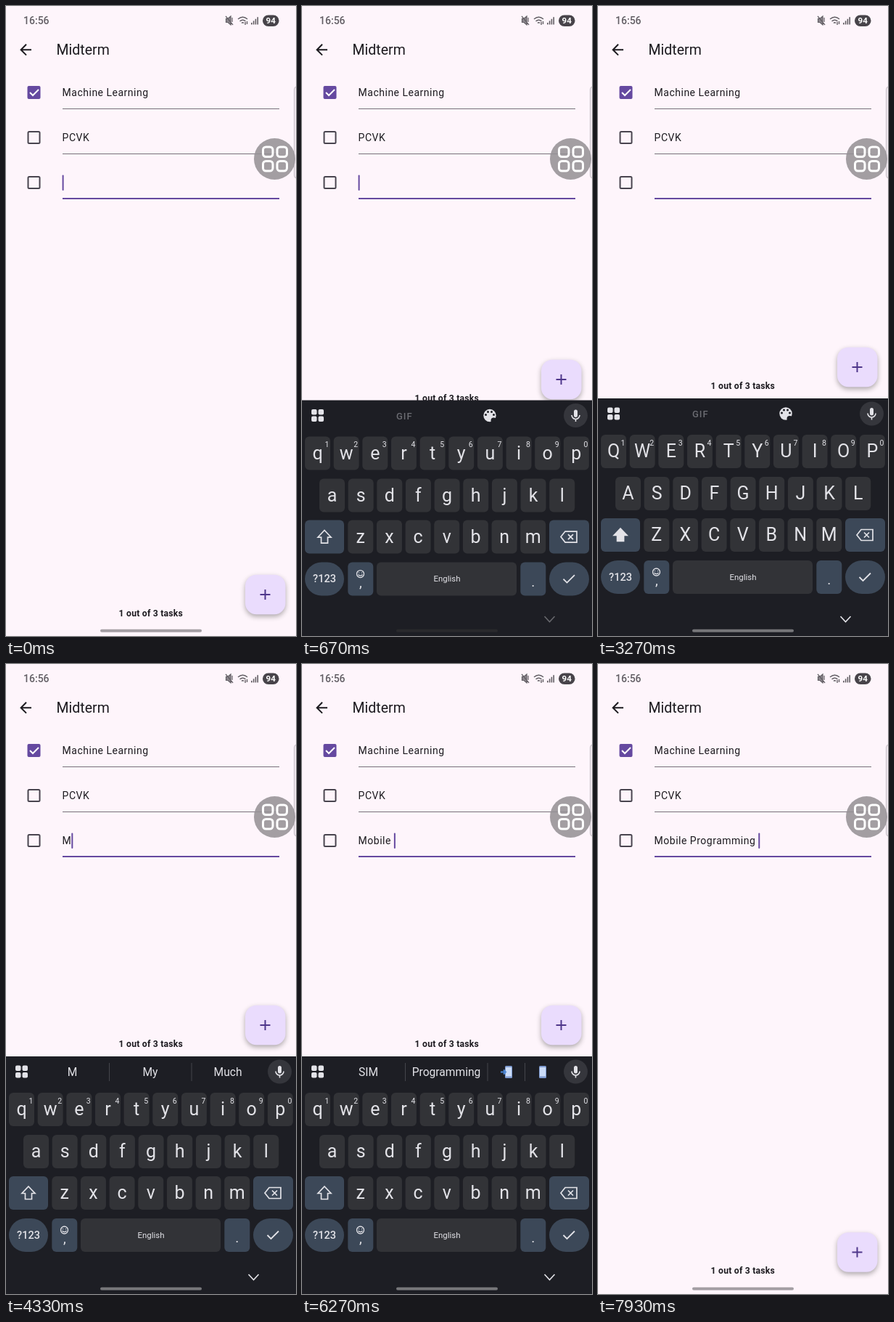
These frames come from a looping animation (400 by 867 pixels, 8 s). An HTML page with a canvas:

```html
<!DOCTYPE html>
<html lang="en">
<head>
<meta charset="utf-8">
<title>Task list</title>
<style>
  html, body { margin: 0; width: 100%; height: 100%; overflow: hidden; background: #fef5fb; }
  canvas { display: block; }
</style>
</head>
<body>
<canvas id="stage" width="400" height="867"></canvas>
<script>
const ctx = document.getElementById("stage").getContext("2d");
const LOOP = 8000, KEYBOARD = 327, INSET = 313;
const PURPLE = "#6549a0", INK = "#1d1b20", LIGHT = "#e3e3e8";
const KEY = "#323337", ACTION = "#3c4858", DARK = "#1d1e24";

const CURSOR_TOGGLES = [130, 630, 1130, 1600, 2130, 2670, 3170, 3670, 5870, 6090, 6600, 6930, 7430, 7930];

// Time, field text, suggestions
const TYPING = [
  [0, ""],
  [4180, "M", ["M", "My", "Much"]],
  [4670, "Mo", ["Mo", "More", "Most"]],
  [4860, "Mob", ["Mob", "Mobile", "Mobs"]],
  [5030, "Mobi", ["Mobi", "Mobile", "Mobility"]],
  [5200, "Mobil", ["Mobil", "Mobile", "Mobility"]],
  [5370, "Mobile", ["Mobile", "Mobiles", null]],
  [6090, "Mobile ", ["SIM", "Programming", null]],
  [6930, "Mobile Programming ", []],
];

// Time, x, y, pressed key
const TAPS = [
  [2930, 31, 728, "shift"], [4070, 319, 730, "m"], [4600, 339, 614, "o"], [4790, 239, 730, "b"],
  [4960, 299, 614, "i"], [5130, 358, 672, "l"], [5300, 101, 614, "e"],
  [5990, 91, 563], [6830, 199, 563], [7430, 361, 846],
];

const ROWS = [["qwertyuiop", 4, 590], ["asdfghjkl", 24, 648], ["zxcvbnm", 63.3, 705]];

const ramp = (t, from, to) => Math.min(1, Math.max(0, (t - from) / (to - from)));

function keyboardRise(t) {
  return t < 7000 ? 1 - (1 - ramp(t, 270, 770)) ** 3 : (1 - ramp(t, 7560, 7880)) ** 3;
}

function text(str, x, y, size, color, { weight = 400, align = "left", spacing = 0 } = {}) {
  ctx.font = `${weight} ${size}px Roboto, sans-serif`;
  ctx.letterSpacing = spacing + "px";
  ctx.textAlign = align;
  ctx.fillStyle = color;
  ctx.fillText(str, x, y);
  return ctx.measureText(str).width;
}

const centered = (str, x, y, size, color, weight = 400) =>
  text(str, x, y, size, color, { weight, align: "center" });

function box(x, y, w, h, r, fill) {
  ctx.beginPath();
  ctx.roundRect(x, y, w, h, r);
  ctx.fillStyle = fill;
  ctx.fill();
}

function frame(x, y, w, h, r, color, width) {
  ctx.beginPath();
  ctx.roundRect(x, y, w, h, r);
  ctx.strokeStyle = color;
  ctx.lineWidth = width;
  ctx.stroke();
}

function disc(x, y, r, fill) {
  ctx.beginPath();
  ctx.arc(x, y, r, 0, Math.PI * 2);
  ctx.fillStyle = fill;
  ctx.fill();
}

function line(d, color, width, fill) {
  const path = new Path2D(d);
  if (fill) { ctx.fillStyle = fill; ctx.fill(path); }
  ctx.strokeStyle = color;
  ctx.lineWidth = width;
  ctx.stroke(path);
}

function drawStatusBar() {
  const grey = "#625e64";
  text("16:56", 24, 25, 14, grey, { weight: 500 });
  line("M303.5 17.5h2.5l4-3.5v12l-4-3.5h-2.5zM303 14l10 12M312 16v6", grey, 1.2, "#8b868c");
  line("M320 18q6.500-5.500 13 0M322.500 21q4-3.500 8 0M325 23.500q1.500-1.500 3 0M330 22v4M332.500 21v4", grey, 1.4);
  for (let i = 0; i < 4; i++) box(338 + i * 2.8, 23 - i * 2.6, 1.6, 2.5 + i * 2.6, 0, grey);
  box(354, 12.5, 22.5, 15.5, 7.7, "#48444a");
  centered("94", 365.2, 24.4, 11.5, "#fff", 700);
}

function drawTask(label, y, checked, focused) {
  if (checked) {
    box(29.5, y - 9, 18, 18, 2, PURPLE);
    line(`M33 ${y}l4 4l8-8`, "#fff", 2);
  } else {
    frame(30.5, y - 8, 16, 16, 1.5, "#49454f", 2);
  }
  const width = text(label, 77.6, y + 4.8, 14, INK, { spacing: 0.5 });
  box(78, y + (focused ? 21 : 22), 299, focused ? 2 : 1, 0, focused ? PURPLE : "#77727a");
  return width;
}

function drawApp(t, label) {
  ctx.fillStyle = "#fef5fb";
  ctx.fillRect(0, 0, 400, 867);
  drawStatusBar();
  line("M35 60.200H21M28 52.800l-7.400 7.400l7.400 7.400", INK, 2);
  text("Midterm", 69.6, 66.8, 19.5, INK);

  drawTask("Machine Learning", 119, true);
  drawTask("PCVK", 181);
  const width = drawTask(label, 243, false, true);
  const toggles = CURSOR_TOGGLES.filter(time => time <= t).length;
  if (toggles % 2 === 0) box(77.6 + width, 232.500, 2, 21.500, 1, PURPLE);

  box(397, 110.5, 8, 127, 4, "#f3eaf1");
  frame(397.5, 111, 8, 126, 4, "#c4bec4", 1);
  disc(370.5, 210.5, 28.5, "rgba(150,145,150,.87)");
  for (const x of [354.5, 374]) for (const y of [194, 213.500]) frame(x, y, 13.500, 13.500, 4, "#fff", 3);

  ctx.save();
  ctx.translate(0, -INSET * keyboardRise(t - 90));
  text("1 out of 3 tasks", 155.6, 840, 12.2, INK, { weight: 700, spacing: 0.22 });
  ctx.shadowColor = "rgba(0,0,0,.32)";
  ctx.shadowBlur = 7;
  ctx.shadowOffsetY = 3;
  box(330, 782.8, 55.5, 54.5, 15.5, "#eadcfd");
  ctx.shadowColor = "transparent";
  line("M350.500 810h14M357.500 803v14", "#4f378b", 2);
  ctx.restore();
}

function drawPhone(x) {
  box(x - 5, 553, 10, 17, 1.5, "#7f9bd0");
  box(x - 4, 555, 8, 12.5, 0.5, "#cbdcf8");
}

function drawToolbar(words) {
  for (const x of [13, 22.500]) for (const y of [552.5, 562]) box(x, y, 7.500, 7.500, 2, LIGHT);
  disc(377.5, 561, 16.5, "#35363c");
  box(375, 553, 5, 10.5, 2.500, LIGHT);
  line("M372 560.500a5.500 5.500 0 0 0 11 0M377.500 566v3.500", LIGHT, 1.6);

  if (!words) {
    text("GIF", 130, 566, 13, "#6b6c72", { weight: 500, spacing: 1 });
    disc(259, 561, 8.7, LIGHT);
    for (const [x, y] of [[253.5, 560], [256.5, 556], [261.5, 556], [264.500, 560]]) disc(x, y, 1.5, DARK);
    disc(264.5, 568, 4, DARK);
    return;
  }
  if (!words.length) return;
  const dividers = [142.5, 256];
  words.forEach((word, i) => {
    if (word) return centered(word, [91.5, 199, 306][i], 567, 15.6, LIGHT);
    dividers.push(307.5);
    drawPhone(285);
    drawPhone(332);
    line("M274 561.500h7M278 558.500l3 3l-3 3", "#4c86d4", 2);
  });
  for (const x of dividers) box(x - 0.5, 549, 1, 25, 0, "#44454b");
}

function drawKeyboard(t, words) {
  const caps = t >= 2930 && t < 4230;
  const tap = TAPS.find(([time]) => t >= time && t < time + 130);
  const pressed = tap && tap[3];

  ctx.fillStyle = DARK;
  ctx.fillRect(0, 540, 400, KEYBOARD);
  drawToolbar(words);

  ROWS.forEach(([letters, left, top], row) => [...letters].forEach((letter, i) => {
    const x = left + i * 39.65;
    box(x, top, 35, 46, 6, pressed === letter ? "#56575c" : KEY);
    centered(caps ? letter.toUpperCase() : letter, x + 17.5, top + 31, 25, LIGHT);
    if (row === 0) centered((i + 1) % 10, x + 30.5, top + 14.5, 10.5, LIGHT);
  }));

  box(4, 705, 54, 46, 6, pressed === "shift" ? "#5b6879" : ACTION);
  line("M31 719l9 9.500h-4.500v8h-9v-8h-4.500z", LIGHT, 1.7, caps ? LIGHT : null);
  box(341, 705, 55, 46, 6, ACTION);
  line("M357 728l6-7.500h16v15h-16zM367 724.500l7 7M374 724.500l-7 7", LIGHT, 1.7);

  box(4, 763, 54, 46, 23, ACTION);
  centered("?123", 31, 790.5, 14.5, LIGHT, 500);
  box(63.3, 763, 35, 46, 6, ACTION);
  frame(75.5, 774, 10, 10, 5, LIGHT, 1.3);
  line("M77.500 780q3 3 6 0M78.500 777v1M82.500 777v1", LIGHT, 1.2);
  centered(",", 80.8, 797, 19, LIGHT);
  box(103, 763, 193, 46, 6, KEY);
  centered("English", 200, 789.5, 11.4, LIGHT);
  box(301.3, 763, 35, 46, 6, ACTION);
  centered(".", 318.8, 796, 19, LIGHT);
  box(341, 763, 55, 46, 23, ACTION);
  line("M360.500 786l5 5l10.500-10.500", LIGHT, 1.8);
}

function drawNavigation(t, rise) {
  const settled = ramp(t, 600, 930);
  const grey = Math.round(20 + 98 * settled);
  const covered = rise > 0.05;
  if (covered) {
    if (t >= 7400 && t < 7700) box(305, 821, 73, 45, 22.500, "#454549");
    ctx.globalAlpha = (0.2 + 0.8 * settled) * ramp(rise, 0.05, 0.6);
    line("M334.500 840l7 7.500l7-7.500", LIGHT, 1.6);
    ctx.globalAlpha = 1;
  }
  box(130, 857.8, 140, 4, 2, covered ? `rgb(${grey},${grey},${grey + 3})` : "#a49fa4");
}

function drawTouch(t) {
  const tap = TAPS.find(([time]) => t >= time && t < time + 130);
  if (tap) disc(tap[1], tap[2], 8.5, "rgba(185,205,230,.82)");
}

function render(t) {
  const [, label, words] = TYPING.findLast(([time]) => time <= t);
  const rise = keyboardRise(t);
  drawApp(t, label);
  if (rise > 0) {
    ctx.save();
    ctx.translate(0, KEYBOARD * (1 - rise));
    drawKeyboard(t, words);
    ctx.restore();
  }
  drawNavigation(t, rise);
  drawTouch(t);
}

const start = performance.now();
function tick() {
  render((performance.now() - start) % LOOP);
  requestAnimationFrame(tick);
}
tick();
</script>
</body>
</html>
```
